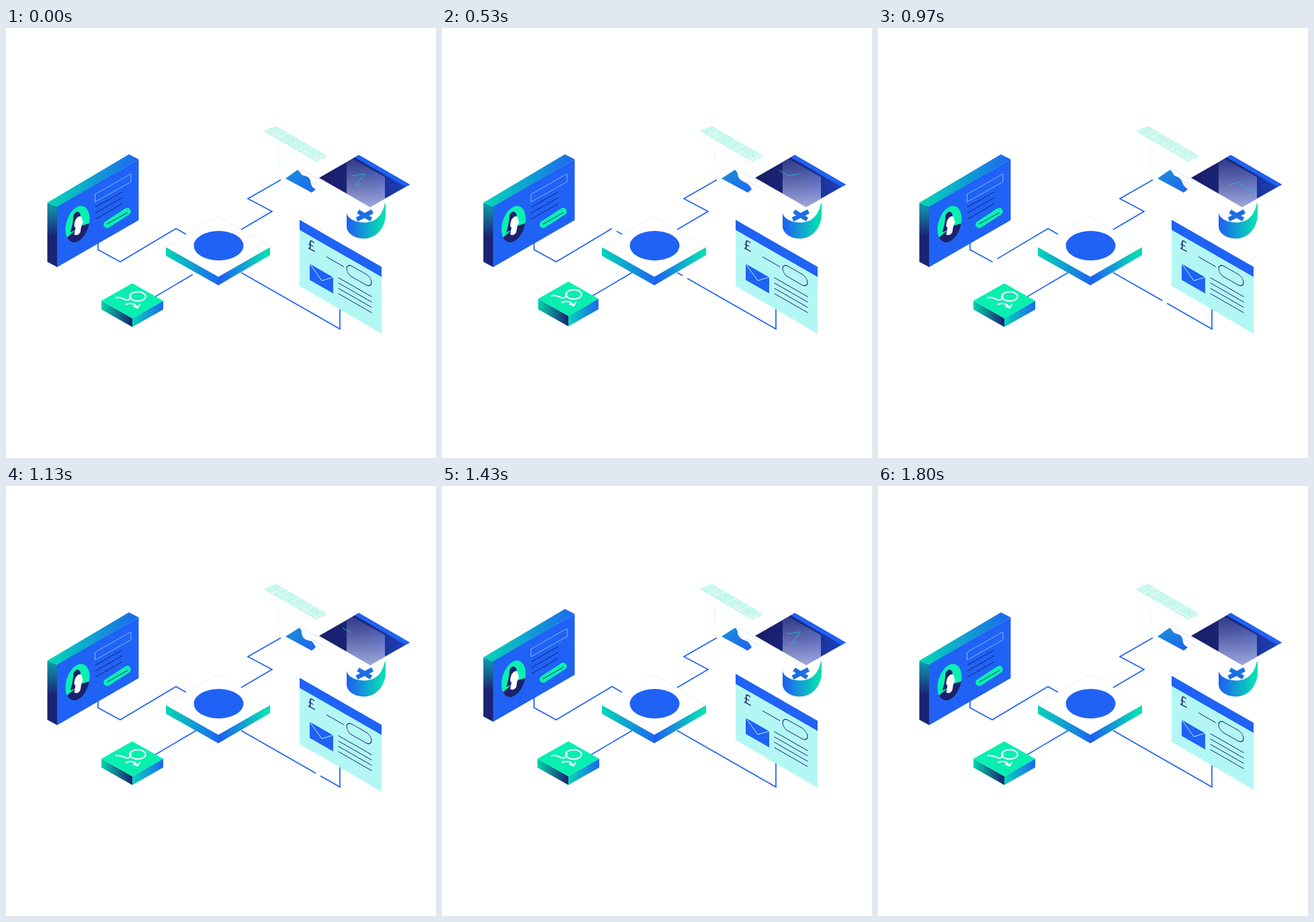
An HTML page that plays this animation: 640x640 px, repeating every 1830 ms.

```html
<!DOCTYPE html>
<html lang="en">
<head>
<meta charset="utf-8">
<style>
html, body { margin: 0; width: 100%; height: 100%; overflow: hidden; background: #fff; }
svg { display: block; width: 100vw; height: 100vh; }
.wire { fill: none; stroke: #1f62f5; stroke-width: 1.7; }
.navy { fill: none; stroke: #1b2070; stroke-width: 1; }
.blue { fill: #1f62f5; }
</style>
</head>
<body>
<svg viewBox="0 0 640 640">
  <defs>
    <linearGradient id="tealBlue"><stop stop-color="#05d6b6"/><stop offset="1" stop-color="#1c68ee"/></linearGradient>
    <linearGradient id="blueTeal"><stop stop-color="#1f5cf5"/><stop offset=".9" stop-color="#06dcb4"/></linearGradient>
    <linearGradient id="tealNavy"><stop stop-color="#06d4ad"/><stop offset="1" stop-color="#1b2070"/></linearGradient>
    <linearGradient id="sideNavy" x2="0" y2="1"><stop stop-color="#0e9fae"/><stop offset=".52" stop-color="#1b2474"/></linearGradient>
    <linearGradient id="screen"><stop stop-color="#191d68"/><stop offset=".55" stop-color="#1b2880"/><stop offset="1" stop-color="#1c43c4"/></linearGradient>
    <linearGradient id="beam" x2="0" y2="1"><stop stop-color="#a8b4f0" stop-opacity=".15"/><stop offset="1" stop-color="#ccd3fa" stop-opacity=".75"/></linearGradient>
    <linearGradient id="area" y2="1"><stop stop-color="#1a92d6"/><stop offset="1" stop-color="#1f62f5"/></linearGradient>
    <clipPath id="face"><ellipse rx="18" ry="26"/></clipPath>
  </defs>

  <path class="wire" d="M350 300L396 273L360 254L409 226"/>
  <path class="wire" id="wireLeft" d="M268 307L253 298.500L170 348L137 330V308"/>
  <path class="wire" id="wireTile" d="M283 364L215 404"/>
  <path class="wire" id="wireRight" d="M350 364L497 448V400"/>

  <!-- centre platform -->
  <path fill="url(#tealBlue)" d="M238 326L316 370V383L238 339Z"/>
  <path fill="url(#blueTeal)" d="M316 370L393 326V338L316 383Z"/>
  <path fill="#fff" stroke="#d5e6fb" stroke-width=".6" d="M315 280L393 326L316 370L238 326Z"/>
  <ellipse class="blue" cx="316.500" cy="324" rx="37" ry="22"/>

  <!-- profile card -->
  <g id="profile">
    <path fill="url(#sideNavy)" d="M61.500 260L76.500 266V356L61.500 348Z"/>
    <path fill="url(#tealBlue)" d="M61.500 260L183 188L197.500 195.500L76.500 266.500Z"/>
    <path class="blue" d="M76 266L197.500 195.500V286L76 356Z"/>
    <g transform="matrix(1 -.45 0 1 106.500 292)" clip-path="url(#face)">
      <rect x="-20" y="-30" width="40" height="60" fill="#09f0b2"/>
      <path fill="#1b2070" d="M20 7L6 5Q-6 8 -20 15V30H20Z"/>
      <path fill="#1b2070" d="M-6 -16Q-1 -23 4 -14L6 0Q0 10 -11 7Q-7 -1 -6 -16Z"/>
      <path fill="#fff" d="M-3 -8Q2 -13 6 -8L8 1Q5 6 5 9L4 14Q0 18 -5 13L-3 4Q-7 1 -3 -8Z"/>
    </g>
    <path fill="none" stroke="#86b4ff" d="M132.500 247.500L186 217V229L132.500 259Z"/>
    <path class="navy" d="M133 266.500L173 244M133 275.500L173 252.500M133 284.500L173 261.500"/>
    <path stroke="#09f0b2" stroke-width="10.500" stroke-linecap="round" d="M150.500 292.500L180.500 273"/>
    <path class="navy" d="M150 292L181 274.500"/>
  </g>

  <!-- flow tile -->
  <path id="tileL" fill="url(#tealNavy)"/>
  <path id="tileR" fill="url(#tealBlue)"/>
  <path id="tileTop" fill="#08efb0"/>
  <g id="flow" fill="none" stroke="#fff" stroke-width="2" stroke-linecap="round">
    <ellipse cx="196" cy="399.500" rx="11.800" ry="7"/>
    <path d="M163 401.500C171 399 174 404.500 180 405C184 405 185 402 186 399M179 411.500C186 408 193 411 195 416M190 414L196 416.500L199 411.500"/>
  </g>

  <!-- invoice card -->
  <g id="invoice">
    <path fill="#b3f7f5" d="M437 286L559 356V455L437 384Z"/>
    <path class="blue" d="M437 285.500L559 355.500V370.500L437 300.500Z"/>
    <text transform="matrix(.95 .5 0 1 449.500 328)" font-family="'Open Sans', Arial, sans-serif" font-size="20" fill="#1b2070">£</text>
    <path class="blue" d="M452 351L487 371V395L452 375Z"/>
    <path fill="none" stroke="#b3f7f5" d="M452 351L470 376L487 371"/>
    <path class="navy" d="M477 340.500L503 355.500"/>
    <rect class="navy" transform="matrix(1 .56 0 1 525.500 368.500)" x="-18.500" y="-8" width="37" height="16" rx="8"/>
    <path class="navy" id="rows"/>
  </g>

  <!-- report -->
  <path id="report" fill="none" stroke="#7df3d6" stroke-width="1.100" stroke-dasharray="13 1 8 1 19 1"/>
  <path fill="none" stroke="#d9f8ef" stroke-width=".8" d="M405.500 176V204L418 212"/>
  <path fill="none" stroke="#d8def8" stroke-width=".9" d="M437 209L471 229M453 227L471 237"/>
  <path id="chart" fill="url(#area)"/>

  <!-- badge -->
  <path fill="url(#blueTeal)" d="M507 273V295C507 306 519 313.500 533 313.500C553 313 565 295 565 277V261Z"/>
  <path fill="#fff" d="M564.500 259C561 275 554 289 534 289.500C518 289.500 507 282 507 274C507 268 513 260 522 260Z"/>
  <path stroke="#1b6fe4" stroke-width="6.500" d="M524 273L543.500 285M522 285L545.500 273"/>

  <!-- tablet -->
  <path fill="url(#screen)" d="M525 189L601 233L542 266.500L466 223Z"/>
  <path class="blue" d="M525 189L601 233L595 236.500L519 192.500Z"/>
  <path fill="url(#beam)" d="M507 199.500L516 194.500L564 222V254L542 266.500L507 247Z"/>
  <path id="pulse" fill="none" stroke="#20b9c4" d="M501 211L516 220L534 217L519 235L537 229L541 234L562 245"/>
</svg>
<script>
const LOOP = 1830, GAP = 8;
const el = id => document.getElementById(id);
const set = (id, name, value) => el(id).setAttribute(name, value);
const clamp = v => Math.min(1, Math.max(0, v));
const hump = (t, start, length) => Math.sin(Math.PI * clamp((t - start) / length));

set('rows', 'd', [0, 1, 2, 3].map(i => `M494.5 ${371.5 + i * 7.9}l50 28.600`).join(''));
set('report', 'd', [0, 1, 2, 3, 4, 5].map(i => `M${385 + i * 3} ${153 - i * 1.300}l${79 - i % 3} ${45.5 - i % 3 * .6}`).join(''));

// A short break travelling along a wire
function spark(id, s) {
  const from = Math.max(0, s - GAP / 2);
  set(id, 'stroke-dasharray', s > 0 ? `${from} ${s + GAP / 2 - from} 999` : 'none');
}

const accel = (t, start, rate) => rate * Math.max(0, t - start) ** 2;

function drawTile(lift) {
  const w = 46 - lift * .3, h = 26 - lift * .15, y = 406 - lift * .8, d = 13 + lift * .7;
  const l = 188 - w, r = 188 + w;
  set('tileTop', 'd', `M188 ${y - h}L${r} ${y}L188 ${y + h}L${l} ${y}Z`);
  set('tileL', 'd', `M${l} ${y}L188 ${y + h}v${d}L${l} ${y + d}Z`);
  set('tileR', 'd', `M188 ${y + h}L${r} ${y}v${d}L188 ${y + h + d}Z`);
  set('flow', 'transform', `translate(0 ${-lift * .8})`);
}

const calm = [434,211, 441,217, 438,219, 445,220, 453,222, 453,227, 454,232, 455,237, 458,238, 461,240];
const dip = [437,211, 442,215, 439,219, 441,225, 442,230, 449,230, 452,230, 457,230, 458,234, 461,240];

function drawChart(t) {
  const k = Math.sin(Math.PI * (t % 915 / 915) ** .7) ** 2;
  const p = calm.map((v, i) => (v + (dip[i] - v) * k).toFixed(2));
  set('chart', 'd', `M416 224L${p[0]} ${p[1]}C${p.slice(2).join(' ')}L455 245Z`);
}

const pulseLength = el('pulse').getTotalLength();

function drawPulse(t) {
  const start = [1130, 428, -312].find(s => t >= s), age = t - start;
  const head = clamp(.13 + age / 600) * pulseLength;
  const tail = clamp(age / 680) ** 2.5 * pulseLength;
  set('pulse', 'stroke-dasharray', `0 ${tail} ${head - tail} 999`);
}

function frame(now) {
  const t = now % LOOP;
  spark('wireTile', 2 + 62 * (t / 330) ** 1.4);
  spark('wireLeft', accel(t, 294, 2.385e-4));
  spark('wireRight', accel(t, 250, 1.7e-4));
  drawTile(5 * hump(t, 380, 560));
  set('profile', 'transform', `translate(0 ${-5 * hump(t, 1140, 530)})`);
  set('invoice', 'transform', `translate(0 ${-8.3 * Math.max(0, hump(t, 1330, 500)) ** .6})`);
  drawChart(t);
  drawPulse(t);
  requestAnimationFrame(frame);
}
frame(performance.now());
</script>
</body>
</html>
```
